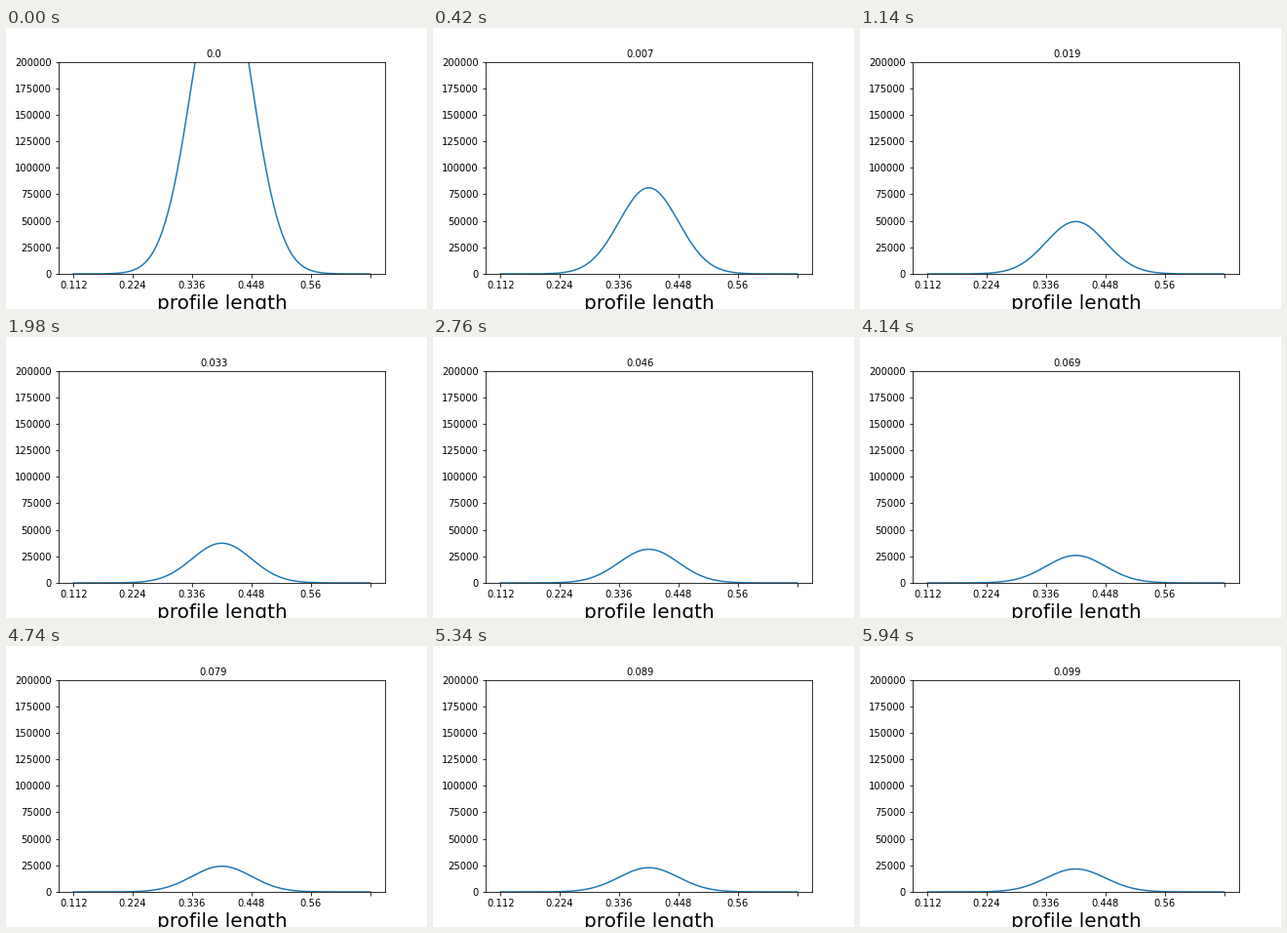
A matplotlib script that plays this animation: 432x288 px, repeating every 6000 ms.

```python
import numpy as np
import matplotlib.pyplot as plt
from matplotlib.animation import FuncAnimation

FRAMES = 100
INTERVAL = 60
LENGTH = 0.56
START_PEAK = 300_000
DECAY_PEAK = 215_000

x = np.linspace(0, LENGTH, 201)
profile = np.exp(-0.5 * ((x - LENGTH / 2) / (LENGTH / 10)) ** 2)


def peak(n):
    """Inverse square root decay that starts from a finite height."""
    start = np.exp(-n / 2) / START_PEAK**2
    return 1 / np.sqrt(n / DECAY_PEAK**2 + start)


fig, ax = plt.subplots(figsize=(6, 4), dpi=72)
fig.subplots_adjust(left=0.125, right=0.9, bottom=0.125, top=0.88)

line, = ax.plot(x, profile * peak(0), color="#1f77b4", lw=1.5)
clock = ax.text(0.475, 1.02, "", transform=ax.transAxes, ha="center", fontsize=10)

ax.set_xlim(-0.05 * LENGTH, 1.05 * LENGTH)
ax.set_ylim(0, 200_000)
ax.set_xticks(np.linspace(0, LENGTH, 6),
              ["0.112", "0.224", "0.336", "0.448", "0.56", ""])
ax.set_xlabel("profile length", fontsize=20)


def update(n):
    line.set_ydata(profile * peak(n))
    clock.set_text(str(n / 1000))
    return line, clock


anim = FuncAnimation(fig, update, frames=FRAMES, interval=INTERVAL,
                     repeat=True, repeat_delay=0)
plt.show()
```
